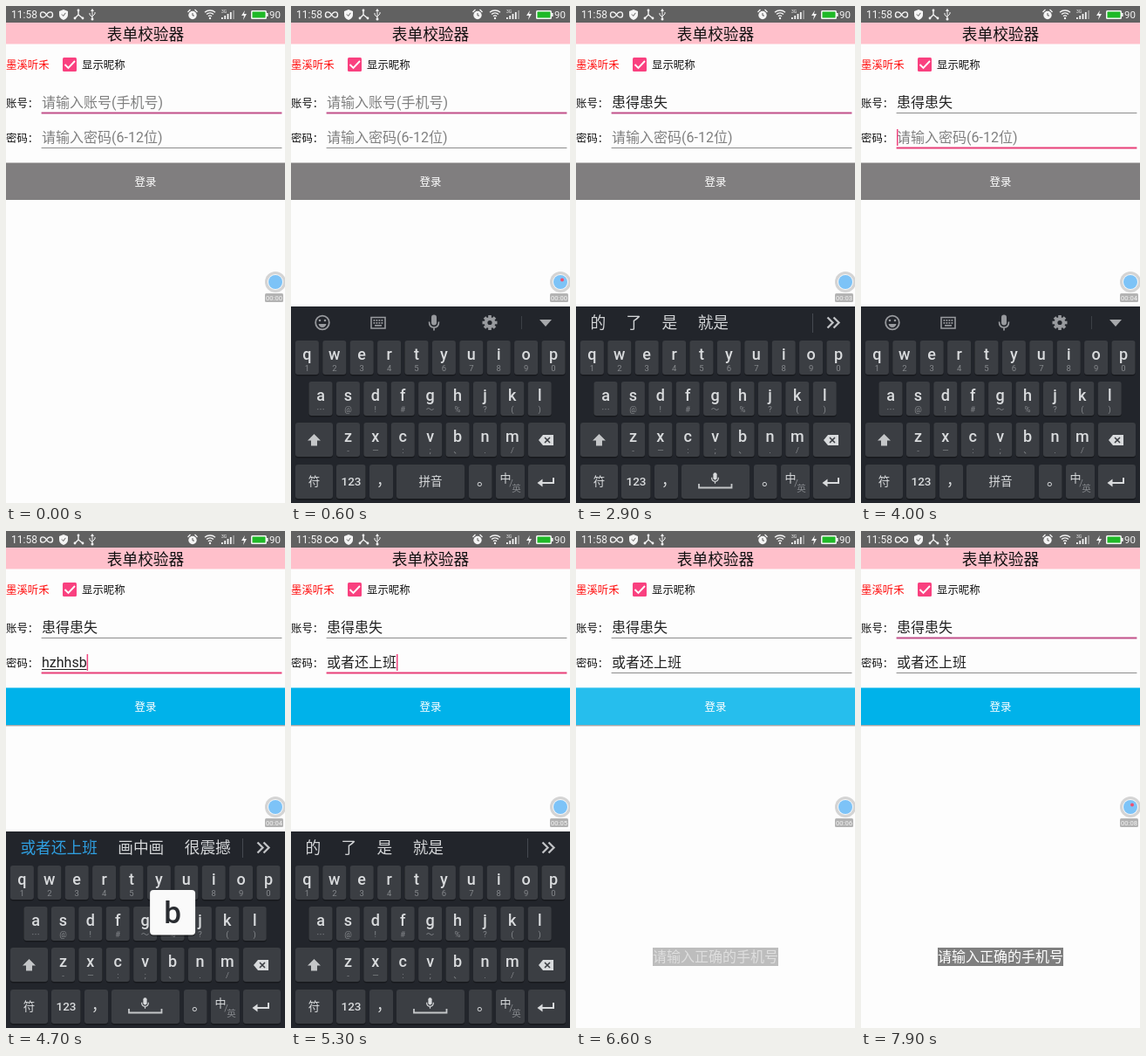
An HTML page with a canvas that plays this animation: 320x569 px, repeating every 8 s.

```html
<!DOCTYPE html>
<html lang="zh-CN">
<head>
<meta charset="utf-8">
<style>
html, body { margin: 0; width: 100%; height: 100%; overflow: hidden; background: #fdfdfd; }
canvas { display: block; width: 100vw; height: 100vh; }
</style>
</head>
<body>
<canvas id="stage" width="320" height="569"></canvas>
<script>
const ctx = document.getElementById('stage').getContext('2d');
const FONT = 'Roboto, "Noto Sans CJK SC", "Noto Sans CJK", sans-serif';
const LOOP = 8000, STEP = 100;
const KEYBOARD_TOP = 344, KEYBOARD_HEIGHT = 225;
const BLUE = '#00b2ea', ICON = '#989a9e', KEY_TEXT = '#d9dbdd';

// y is the visual middle of the line
function text(s, x, y, size, color, align = 'left', weight = 400) {
  ctx.font = `${weight} ${size}px ${FONT}`;
  ctx.fillStyle = color;
  ctx.textAlign = align;
  ctx.fillText(s, x, y + size * 0.37);
  return ctx.measureText(s).width;
}
function rect(x, y, w, h, color, radius = 0) {
  ctx.fillStyle = color;
  ctx.beginPath();
  ctx.roundRect(x, y, w, h, radius);
  ctx.fill();
}
function disc(x, y, r, color) {
  ctx.fillStyle = color;
  ctx.beginPath();
  ctx.arc(x, y, r, 0, 7);
  ctx.fill();
}
function path(d, color, width = 0) {
  const p = new Path2D(d);
  if (width) {
    ctx.strokeStyle = color;
    ctx.lineWidth = width;
    ctx.stroke(p);
  } else {
    ctx.fillStyle = color;
    ctx.fill(p);
  }
}
function at(x, y, draw) {
  ctx.save();
  ctx.translate(x, y);
  draw();
  ctx.restore();
}
const within = (t, spans) => spans.some(([from, to]) => t >= from && t < to);
const ease = p => 0.5 - 0.5 * Math.cos(Math.PI * Math.min(1, Math.max(0, p)));

// Timeline
const entries = [
  { start: 1300, keys: 'hdhsh', commit: 2400, end: 3800, result: '患得患失',
    words: ['好 和 会 还 很', '好的 活动 还得', '还得换 很多话', '患得患 或多或', '患得患失 或多或少 核电荷数'] },
  { start: 4200, keys: 'hzhhsb', commit: 5200, end: 5800, result: '或者还上班',
    words: ['好 和 会 还 很', '孩子 或者 杭州', '或者还 很执行', '或者还好 很正好', '或者还会 很重视', '或者还上班 画中画 很震撼'] }
];
const accountFocus = [[0, 3800], [7900, LOOP]];
const passwordFocus = [[3800, 5800]];
const accountCursor = [[100, 600], [1100, 2900], [3500, 3800]];
const passwordCursor = [[3800, 5800]];
const redDot = [[500, 1000], [1500, 1800], [2700, 2900], [3700, 3900], [5000, 5200],
  [5800, 6300], [6800, 7500], [7900, LOOP]];

function statusBar() {
  const white = '#f4f4f4';
  rect(0, 0, 320, 19, '#616161');
  text('11:58', 6, 10, 12, white);
  path('M46.5 10c-2.5-4.2-7-4.2-7 0s4.5 4.2 7 0c2.5-4.2 7-4.2 7 0s-4.5 4.2-7 0', white, 1.4);
  path('M66 4l5 2v4q0 4-5 6q-5-2-5-6v-4z', white);
  path('M64 9.5l1.7 2 2.6-3.6', '#616161', 1);
  path('M83 5v5l-4 4M83 10l5 4', white, 1.4);
  for (const [x, y] of [[83, 5], [79, 14], [88, 14]]) disc(x, y, 1.4, white);
  path('M99 4v11M96 8v2l3 3M102 7v2l-3 3', white, 1);
  path('M97 6l2-3 2 3z', white);
  disc(99, 15, 1.5, white);

  disc(214, 10.5, 4.7, white);
  path('M214 8v3h2', '#616161', 1);
  path('M208.5 7l3-3M219.5 7l-3-3', white, 1.3);
  for (const r of [3, 6, 9]) {
    ctx.beginPath();
    ctx.arc(234, 14, r, -2.3, -0.84);
    ctx.strokeStyle = white;
    ctx.lineWidth = 1.3;
    ctx.stroke();
  }
  disc(234, 14, 1.2, white);
  text('3G', 247, 6.5, 5, white);
  for (let i = 0; i < 5; i++) rect(247 + i * 3.3, 13 - i * 2, 1.8, 2 + i * 2, i < 4 ? white : '#999');
  path('M274 5l-4 6h3l-1 5 4-7h-3z', white);
  rect(281, 5, 18, 10, white, 1.5);
  rect(299, 8, 1.6, 4, white);
  rect(282.5, 6.5, 15, 7, '#1fb927', 0.5);
  text('90', 302, 10, 11.5, white);
}

function field(label, hint, y, value, composing, focus, cursor, accent) {
  text(label, 0, y + 0.5, 12.4, '#111');
  const width = text(value || hint, 41, y - 0.5, 16, value ? '#222' : '#808080');
  if (composing) rect(41, y + 7, width, 1, '#222');
  if (cursor) rect(value ? 41 + width : 41, y - 10, 1.5, 19, '#f0457f');
  if (focus) rect(40.6, y + 10.6, 275.8, 1.8, accent);
  else rect(40.6, y + 11.1, 275.8, 0.9, '#8c8c8c');
}

function recorder(t) {
  disc(309, 316, 12, '#d4d4d4');
  disc(309, 316, 9, '#f8f8f8');
  disc(309, 316, 8, '#7dc3f7');
  if (within(t, redDot)) disc(311, 313.5, 2, '#f0506e');
  rect(297, 329, 21, 10, '#b3b3b3', 1.5);
  text('00:0' + Math.floor((t + 100) / 1000), 307.5, 334, 7.6, '#f4f4f4', 'center');
}

// Keyboard
const PITCH = 31.4;
const letters = {};
function addRow(keys, marks, x, y) {
  [...keys].forEach((key, i) => { letters[key] = { x: x + i * PITCH, y, mark: marks[i] }; });
}
addRow('qwertyuiop', '1234567890', 18.4, 383);
addRow('asdfghjkl', '⋯@!#～%?()', 34, 430);
addRow('zxcvbnm', '-—:;、./', 65.5, 477);

function mic(x, y, scale, color) {
  at(x, y, () => {
    ctx.scale(scale, scale);
    rect(-3, -9, 6, 12, color, 3);
    path('M-5.5-1q0 6.5 5.5 6.5t5.5-6.5M0 5.5v3.5', color, 1.7);
  });
}

function toolbar(pressed) {
  ctx.strokeStyle = ICON;
  ctx.lineWidth = 1.8;
  ctx.beginPath();
  ctx.arc(36, 362.5, 7.8, 0, 7);
  ctx.stroke();
  disc(33, 360, 1.3, ICON);
  disc(39, 360, 1.3, ICON);
  path('M31.5 364h9q-1 4-4.5 4t-4.5-4', ICON);
  path('M92 356.5h16v12.5h-16z', ICON, 1.6);
  for (let i = 0; i < 8; i++) rect(94.5 + (i % 4) * 3, 359 + (i >> 2) * 3, 1.8, 1.8, ICON);
  rect(96, 365, 8, 1.6, ICON);
  mic(164, 362.5, 1, ICON);
  at(228, 362.5, () => {
    for (let i = 0; i < 8; i++) {
      rect(-1.8, -8.5, 3.6, 5, ICON);
      ctx.rotate(Math.PI / 4);
    }
    disc(0, 0, 6.3, ICON);
    disc(0, 0, 2.6, '#22252b');
  });
  rect(264, 355, 1, 15, '#3c4046');
  path('M285 359h14l-7 8z', pressed ? '#2da5ea' : '#a6a8ab');
}

function candidates(words, predicted, pressed) {
  if (pressed) rect(3, 347, 97, 35, '#34383e');
  ctx.save();
  ctx.beginPath();
  ctx.rect(0, 345, 271, 37);
  ctx.clip();
  let x = 16.4;
  words.split(' ').forEach((word, i) => {
    x += text(word, x, 362.5, 17.7, i || predicted ? '#d4d6d8' : '#2f9fe0') + 23.4;
  });
  ctx.restore();
  rect(271, 352, 1, 22, '#454950');
  path('M288.5 356.5l6 6-6 6M295.5 356.5l6 6-6 6', '#c0c2c5', 2.3);
}

function keyCap(x, y, w) {
  rect(x, y + 1, w, 39.5, '#17191d', 3);
  rect(x, y, w, 39, '#3b3e43', 3);
}

function keyboard(t, entry) {
  rect(0, KEYBOARD_TOP, 320, KEYBOARD_HEIGHT, '#22252b');
  const count = entry ? Math.min(entry.keys.length, (t - entry.start) / STEP + 1) : 0;
  if (entry) {
    const predicted = t >= entry.commit;
    candidates(predicted ? '的 了 是 就是' : entry.words[count - 1], predicted, t === entry.commit - STEP);
  } else {
    toolbar(t >= 5800);
  }

  for (const [letter, { x, y, mark }] of Object.entries(letters)) {
    keyCap(x - 13.5, y, 27);
    text(letter, x, y + 15.5, 18, KEY_TEXT, 'center', 500);
    text(mark, x, y + 31, 9.5, '#85888c', 'center');
  }
  keyCap(5, 477, 43);
  path('M26.5 490l7.5 7.5h-4v6h-7v-6h-4z', '#c4c6c8');
  keyCap(272, 477, 43);
  path('M284 497l5-6h12v12h-12z', KEY_TEXT);
  path('M291 494l6 6M297 494l-6 6', '#3b3e43', 1.6);

  for (const [x, w] of [[5, 43], [52, 33.5], [90, 27], [121, 78], [204, 26.5], [235, 33], [272, 43]]) keyCap(x, 525, w);
  text('符', 26.5, 544.5, 13.5, KEY_TEXT, 'center');
  text('123', 69, 544.5, 13.5, KEY_TEXT, 'center', 500);
  text('，', 98, 543, 17, KEY_TEXT, 'left', 500);
  text('。', 213, 543, 17, KEY_TEXT, 'left', 500);
  text('中', 246, 540, 13, KEY_TEXT, 'center');
  text('/', 252.5, 546, 11, '#85888c', 'center');
  text('英', 258.5, 552, 10.5, '#85888c', 'center');
  path('M301 540v6h-15', KEY_TEXT, 2);
  path('M282.5 546l6-4.5v9z', KEY_TEXT);
  if (entry) {
    mic(159.5, 540.5, 0.7, KEY_TEXT);
    path('M141 547v4.5h37.5v-4.5', '#c4c6c8', 1.8);
  } else {
    text('拼音', 160, 544.5, 13.5, KEY_TEXT, 'center', 500);
  }

  if (entry && t <= entry.start + entry.keys.length * STEP) {
    const letter = entry.keys[count - 1], key = letters[letter];
    const left = key.x - 26, top = key.y - 66;
    rect(left, top + 1, 52, 52, '#0006', 4);
    rect(left, top, 52, 51.5, '#fafafa', 4);
    text(letter, key.x, top + 25, 35, '#292c31', 'center', 500);
  }
}

function loginButton(t, enabled) {
  rect(0, 179.5, 320, 42.5, enabled ? BLUE : '#807e7f');
  if (enabled) {
    rect(0, 222, 320, 1, '#0005');
    rect(0, 223, 320, 1, '#0002');
  }
  if (within(t, [[6300, 6700]])) {
    ctx.save();
    ctx.beginPath();
    ctx.rect(0, 180, 320, 42);
    ctx.clip();
    disc(160, 201, 50 + (t - 6300) * 0.4, 'rgba(255,255,255,.15)');
    ctx.restore();
  }
  text('登录', 160, 201, 12.4, '#fff', 'center', 500);
}

function fieldValue(t, entry) {
  if (t < entry.start) return '';
  return t < entry.commit ? entry.keys.slice(0, (t - entry.start) / STEP + 1) : entry.result;
}

function draw(t) {
  const [account, password] = entries;
  const composing = e => t >= e.start && t < e.commit;
  rect(0, 0, 320, 569, '#fdfdfd');
  statusBar();
  rect(0, 19, 320, 24.5, '#ffc0cb');
  text('表单校验器', 160, 32, 17.7, '#111', 'center');
  text('墨溪听禾', 0, 67, 12.4, '#ff1010');
  rect(65, 59, 16, 16, '#f9407f', 1.5);
  path('M67.5 67l4 4 7.5-8', '#fff', 1.9);
  text('显示昵称', 87, 67, 12.4, '#111');
  field('账号：', '请输入账号(手机号)', 111, fieldValue(t, account), composing(account),
    within(t, accountFocus), within(t, accountCursor), '#c2508a');
  field('密码：', '请输入密码(6-12位)', 151, fieldValue(t, password), composing(password),
    within(t, passwordFocus), within(t, passwordCursor), '#e83f78');
  loginButton(t, t >= password.start);
  recorder(t);

  const hidden = t < 3000 ? 1 - ease((t - 200) / 350) : ease((t - 5800) / 312);
  if (hidden < 1) {
    const entry = entries.find(e => t >= e.start && t < e.end);
    at(0, Math.round(hidden * KEYBOARD_HEIGHT), () => keyboard(t, entry));
  }
  if (t >= 6500) {
    ctx.globalAlpha = Math.min(1, (t - 6400) / 400);
    rect(88, 477, 144, 21, '#7f7f7f');
    text('请输入正确的手机号', 160, 487.5, 16, '#fff', 'center');
    ctx.globalAlpha = 1;
  }
}

// The screen advances in steps of a tenth of a second
const origin = performance.now();
function tick() {
  const elapsed = (performance.now() - origin) % LOOP;
  draw(Math.floor(elapsed / STEP) * STEP);
  requestAnimationFrame(tick);
}
tick();
</script>
</body>
</html>
```
